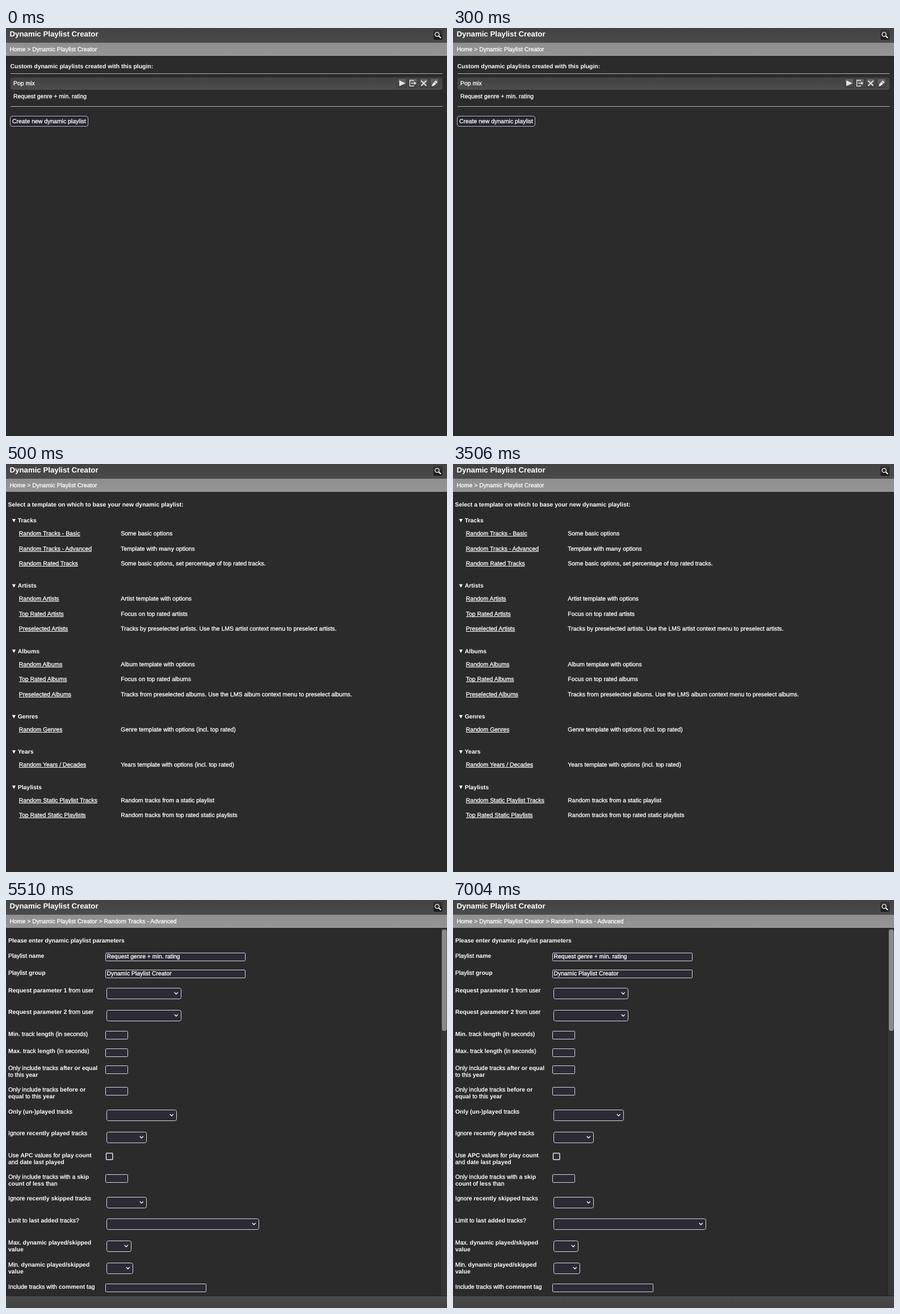
Write an HTML page with a canvas that moves like this. It is 777 px wide and 720 px high and loops after 8 s.

```html
<!DOCTYPE html>
<html lang="en">
<head>
<meta charset="utf-8">
<title>Dynamic Playlist Creator</title>
<style>
  html, body { margin: 0; width: 100%; height: 100%; overflow: hidden; background: #2b2b2b; }
  canvas { display: block; width: 777px; height: 720px; }
</style>
</head>
<body>
<canvas id="stage" width="777" height="720"></canvas>
<script>
const ctx = document.getElementById('stage').getContext('2d');
const LOOP = 8000, LIST_END = 500, TEMPLATES_END = 5510;
const FAMILY = '"Liberation Sans", Arial, sans-serif';
const SIZE = 10.45;
const FIELD = '#2c2a35', EDGE = '#d8d8dc';

const baseline = (y, size = SIZE) => Math.round(y + size * 0.29);

// Text centred on y; parts between asterisks are bold. Returns the end x.
function text(str, x, y, size = SIZE) {
  ctx.fillStyle = ctx.strokeStyle = '#fff';
  ctx.lineWidth = 0.3;
  ctx.textRendering = 'geometricPrecision';
  str.split('*').forEach((part, i) => {
    const bold = i % 2 === 1;
    ctx.font = `${bold ? 'bold ' : ''}${size}px ${FAMILY}`;
    ctx.fillText(part, x, baseline(y, size));
    if (!bold) ctx.strokeText(part, x, baseline(y, size));
    x += ctx.measureText(part).width;
  });
  return x;
}

function link(str, x, y) {
  const end = text(str, x, y);
  ctx.fillRect(x, baseline(y) + 1, end - x, 1);
}

function vertical(y, h, top, bottom) {
  const g = ctx.createLinearGradient(0, y, 0, y + h);
  g.addColorStop(0, top);
  g.addColorStop(1, bottom);
  return g;
}

function rect(x, y, w, h, fill) {
  ctx.fillStyle = fill;
  ctx.fillRect(x, y, w, h);
}

function box(x, y, w, h, r, fill, edge, weight = 1) {
  ctx.beginPath();
  ctx.roundRect(x, y, w, h, r);
  ctx.fillStyle = fill;
  ctx.fill();
  if (!edge) return;
  ctx.strokeStyle = edge;
  ctx.lineWidth = weight;
  ctx.stroke();
}

function path(points, color, weight) {
  ctx.beginPath();
  points.forEach(([x, y]) => ctx.lineTo(x, y));
  if (weight) {
    ctx.strokeStyle = color;
    ctx.lineWidth = weight;
    ctx.stroke();
  } else {
    ctx.fillStyle = color;
    ctx.fill();
  }
}

function header(crumbs) {
  rect(0, 0, 777, 720, '#2b2b2b');
  rect(0, 0, 777, 26, vertical(0, 26, '#424242', '#4b4b4b'));
  rect(0, 26, 777, 23, vertical(26, 23, '#8f8f8f', '#959595'));
  rect(0, 49, 777, 1, '#484848');
  rect(0, 50, 777, 1, '#1d1d1d');
  text('*Dynamic Playlist Creator*', 6.5, 11.1, 13.25);
  text(crumbs, 6.5, 37.6);

  box(753.5, 4.5, 15, 16, 2, vertical(4, 17, '#3c3c3c', '#161616'), '#252525');
  ctx.beginPath();
  ctx.arc(759.6, 11.2, 3.6, 0, 7);
  ctx.strokeStyle = '#eee';
  ctx.lineWidth = 1.4;
  ctx.stroke();
  path([[762.2, 13.7], [766.3, 17.8]], '#eee', 2);
}

function iconButton(x) {
  box(x + 0.5, 89.5, 15, 16, 2, vertical(89, 17, '#6a6a6a', '#3d3d3d'), '#393939');
}

function showList() {
  header('Home > Dynamic Playlist Creator');
  text('*Custom dynamic playlists created with this plugin:*', 7.5, 67.6);
  rect(8, 80, 761, 1, '#b4b4b4');
  rect(8, 138, 761, 1, '#b4b4b4');
  box(8, 87, 761, 22, 4, vertical(87, 22, '#414141', '#4d4d4d'));
  text('Pop mix', 13, 98);
  text('Request genre + min. rating', 13, 121);

  [690, 709, 728, 747].forEach(iconButton);
  const ink = '#e4e4e4';
  path([[693, 92.5], [704, 97.5], [693, 102.5]], ink);
  path([[718, 94], [718, 92.5], [711.5, 92.5], [711.5, 102.5], [718, 102.5], [718, 101]], ink, 1.3);
  path([[714, 97.5], [721, 97.5]], ink, 1.5);
  path([[719.5, 94.5], [723, 97.5], [719.5, 100.5]], ink);
  path([[731.5, 93], [740.5, 102]], ink, 2);
  path([[740.5, 93], [731.5, 102]], ink, 2);
  path([[750, 103], [751, 99], [757, 92.5], [760.5, 95.5], [754, 102]], ink);
  path([[755, 95], [758.5, 98]], '#555', 0.8);

  box(7.5, 155.5, 137, 18, 3.5, '#26242d', '#b9b3d3');
  text('Create new dynamic playlist', 11, 164.6);
}

const SECTIONS = [
  ['Tracks',
    ['Random Tracks - Basic', 'Some basic options'],
    ['Random Tracks - Advanced', 'Template with *many* options'],
    ['Random Rated Tracks', 'Some basic options, set percentage of top rated tracks.']],
  ['Artists',
    ['Random Artists', 'Artist template with options'],
    ['Top Rated Artists', 'Focus on top rated artists'],
    ['Preselected Artists', 'Tracks by preselected artists. Use the LMS artist context menu to preselect artists.']],
  ['Albums',
    ['Random Albums', 'Album template with options'],
    ['Top Rated Albums', 'Focus on top rated albums'],
    ['Preselected Albums', 'Tracks from preselected albums. Use the LMS album context menu to preselect albums.']],
  ['Genres', ['Random Genres', 'Genre template with options (incl. top rated)']],
  ['Years', ['Random Years / Decades', 'Years template with options (incl. top rated)']],
  ['Playlists',
    ['Random Static Playlist Tracks', 'Random tracks from a static playlist'],
    ['Top Rated Static Playlists', 'Random tracks from top rated static playlists']]
];

function showTemplates() {
  header('Home > Dynamic Playlist Creator');
  text('*Select a template on which to base your new dynamic playlist:*', 3.5, 71.6);
  let y = 100;
  for (const [title, ...rows] of SECTIONS) {
    path([[10.8, y - 3], [17, y - 3], [13.9, y + 3]], '#fff');
    text(`*${title}*`, 20.7, y);
    rows.forEach(([name, note], i) => {
      const rowY = y + 23 + i * 26.5;
      link(name, 22.8, rowY);
      text(note, 202.3, rowY);
    });
    y += 62.3 + (rows.length - 1) * 26.5;
  }
}

const input = (y, right = 214.5, value = '') => {
  box(175.5, y, right - 175.5, 14, 1, FIELD, EDGE);
  text(value, 177.5, y + 6.5);
};

const select = (y, right) => {
  box(177.5, y, right - 177.5, 19, 3, FIELD, EDGE);
  const x = right - 8.7, mid = y + 9;
  path([[x - 3, mid - 1.5], [x, mid + 1.5], [x + 3, mid - 1.5]], '#fff', 1.3);
};

const checkbox = y => box(176.5, y, 11.5, 11.5, 1.5, FIELD, '#e2e2e2', 1.5);

// Label y, label lines split by |, control, control top, right edge, value.
const FORM = [
  [98.5, 'Playlist *name*', input, 93.5, 421.5, 'Request genre + min. rating'],
  [129, 'Playlist *group*', input, 123.5, 421.5, 'Dynamic Playlist Creator'],
  [159.5, '*Request parameter 1* from user', select, 155.5, 308.5],
  [198, '*Request parameter 2* from user', select, 194.5, 308.5],
  [237, '*Min.* track *length* (in seconds)', input, 231.5],
  [267, '*Max.* track *length* (in seconds)', input, 262.5],
  [297, 'Only include tracks *after or equal*|to this *year*', input, 292.5],
  [335, 'Only include tracks *before or*|*equal* to this *year*', input, 330.5],
  [373.5, '*Only (un-)played* tracks', select, 370.5, 300.5],
  [412, 'Ignore *recently played* tracks', select, 409.5, 247.5],
  [451, 'Use *APC* values for *play count*|and *date last played*', checkbox, 446.7],
  [489, 'Only include tracks with a *skip*|*count* of *less* than', input, 484.5],
  [527, 'Ignore *recently skipped* tracks', select, 524.5, 247.5],
  [566, 'Limit to *last added* tracks?', select, 562.5, 445.5],
  [605, 'Max. *dynamic played/skipped*|*value*', select, 601.5, 220.5],
  [644, 'Min. *dynamic played/skipped*|*value*', select, 640.5, 223.5],
  [683, 'Include tracks with *comment* tag', input, 677.5, 352.5]
];

function showForm() {
  header('Home > Dynamic Playlist Creator > Random Tracks - Advanced');
  text('*Please enter dynamic playlist parameters*', 4, 71.6);
  for (const [y, label, control, ...args] of FORM) {
    label.split('|').forEach((line, i) => text(line, 4, y + i * 11.5));
    control(...args);
  }
  rect(766, 51, 11, 648, '#353535');
  rect(765, 51, 1, 648, '#242424');
  box(768, 52, 8.5, 179, 4, '#8a8a8a');
  rect(0, 698, 777, 1, '#222');
  rect(0, 699, 777, 21, vertical(699, 21, '#4a4a4a', '#424242'));
}

function frame() {
  const t = performance.now() % LOOP;
  if (t < LIST_END) showList();
  else if (t < TEMPLATES_END) showTemplates();
  else showForm();
  requestAnimationFrame(frame);
}
frame();
</script>
</body>
</html>
```
